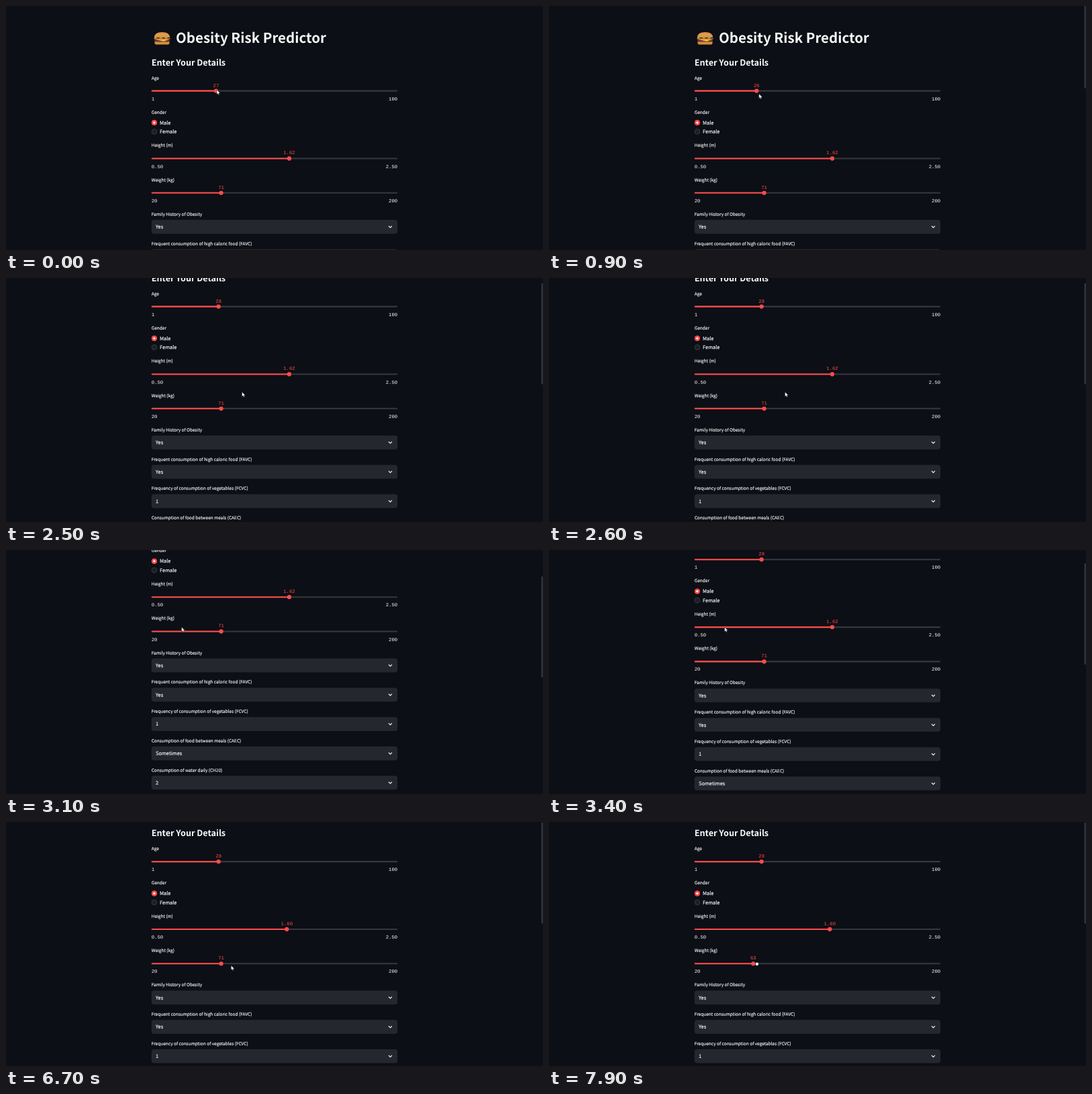
An HTML page that plays this animation: 800x364 px, repeating every 8 s.

```html
<!DOCTYPE html>
<html lang="en">
<head>
<meta charset="utf-8">
<title>Obesity Risk Predictor</title>
<style>
  html, body { margin: 0; width: 100%; height: 100%; overflow: hidden; background: #0c0f15; }
  svg { display: block; width: 800px; height: 364px; }
  text { fill: #fafafa; font-family: "Noto Sans CJK JP", "Noto Sans CJK SC", "Open Sans", sans-serif; text-rendering: geometricPrecision; }
  .title { font-size: 20.5px; font-weight: 700; }
  .heading { font-size: 12.65px; font-weight: 600; }
  .label, .option { stroke: #fafafa; stroke-width: .14px; }
  .label { font-size: 6.53px; }
  .option { font-size: 7.46px; }
  .num { font: 7.29px "Liberation Mono", monospace; }
  .value { fill: #ff4b4b; text-anchor: middle; }
  .end { text-anchor: end; }
</style>
</head>
<body>
<svg viewBox="0 0 800 364">
  <g id="page"></g>
  <rect id="bar" x="797.8" width="1.6" height="151" rx=".8" fill="#42454c"/>
  <g id="cursor" stroke="#14161c" stroke-width=".5" stroke-linejoin="round" fill="#fff">
    <path id="arrow" d="M0 0V6.8L1.6 5.4 2.7 7.7 3.9 7.1 2.9 5H5Z"/>
    <path id="hand" d="M-.8 .8Q0-.4 .8 .8V3.4L3.8 4.2Q4.8 4.6 4.4 6.4L3.6 9H-.4L-2.6 6Q-3 4.6-.8 5.6Z"/>
    <rect id="fist" width="4.4" height="4.6" rx="1.6"/>
  </g>
</svg>
<script>
const LEFT = 216.7, WIDTH = 366.5, RIGHT = LEFT + WIDTH;
const RED = '#ff4b4b', LOOP = 8000, MOVE = 400;
const $ = id => document.getElementById(id);
const set = (id, attrs) => { for (const k in attrs) $(id).setAttribute(k, attrs[k]); };

const text = (cls, x, y, s, id = '') => `<text class="${cls}" id="${id}" x="${x}" y="${y}">${s}</text>`;

// Keys are [arrival time, value, ...]; every move takes the last MOVE ms before its arrival.
const sliders = {
  age: { label: 'Age', min: 1, max: 100, digits: 0, y: 126.6, keys: [[0, 27], [900, 26], [2200, 28]] },
  height: { label: 'Height (m)', min: .5, max: 2.5, digits: 2, y: 227.5, keys: [[0, 1.62], [6000, 1.6]] },
  weight: { label: 'Weight (kg)', min: 20, max: 200, digits: 0, y: 278.8, keys: [[0, 71], [7800, 63]] }
};
const scrollKeys = [[0, 0], [2500, 84], [3100, 157.3], [3600, 67.5]];
const genderKeys = [[0, 'Male'], [4200, 'Female'], [4900, 'Male']];
const pointerKeys = [
  [0, 314, 125, 'arrow'], [900, 312.8, 131, 'arrow'], [2500, 351.5, 170, 'arrow'],
  [3100, 261.5, 115, 'arrow'], [4100, 243, 116, 'hand'], [4700, 242.8, 106, 'hand'],
  [5500, 421, 159, 'arrow'], [6700, 335.3, 214, 'arrow'], [7100, 324, 210, 'fist'], [7800, 307.7, 209.6, 'fist']];

const hold = (keys, t) => keys.filter(k => k[0] <= t).pop();
const ease = (keys, t, n = 1) => {
  const a = hold(keys, t), b = keys[keys.indexOf(a) + 1] || a;
  const p = Math.max(0, 1 - (b[0] - t) / MOVE);
  return a === b ? a[n] : a[n] + (b[n] - a[n]) * p * p * (3 - 2 * p);
};

const slider = ([id, s]) =>
  text('label', LEFT, s.y - 17.1, s.label) +
  `<rect x="${LEFT}" y="${s.y - 1.05}" width="${WIDTH}" height="2.1" rx="1" fill="#36383e"/>
   <rect id="${id}Fill" x="${LEFT}" y="${s.y - 1.05}" height="2.1" rx="1" fill="${RED}"/>
   <circle id="${id}Thumb" cy="${s.y}" r="3.15" fill="${RED}"/>` +
  text('num value', 0, s.y - 6.1, '', id + 'Value') +
  text('num', LEFT, s.y + 14.1, s.min.toFixed(s.digits)) +
  text('num end', RIGHT, s.y + 14.1, s.max.toFixed(s.digits));

const radio = (name, y) =>
  `<circle id="${name}" cx="220.9" cy="${y}" r="3.9" stroke-width=".6"/>
   <circle id="${name}Dot" cx="220.9" cy="${y}" r="1.6" fill="#fff"/>` +
  text('option', 229, y + 2.8, name);

const select = ([label, value], i) => {
  const y = 329.4 + i * 43.75;
  return text('label', LEFT, y - 16.5, label) +
    `<rect x="${LEFT}" y="${y - 10.3}" width="${WIDTH}" height="20.6" rx="4" fill="#25272f"/>
     <path d="M570 ${y - 1.2}l2.5 2.5 2.5-2.5" fill="none" stroke="#fafafa" stroke-width="1.2"/>` +
    text('option', 223, y + 2.8, value);
};

const burger = `
  <path d="M221 47Q221 39 232.5 39T244 47Z" fill="#dc9447"/>
  <path d="M225 43h15" stroke="#f8dfa8" stroke-width=".9" stroke-dasharray="1 2.5"/>
  <path d="M220.6 47.4q2-1.6 4 0t4 0 4 0 4 0 4 0 4 0v1.8h-24Z" fill="#7fb23f"/>
  <rect x="221.4" y="48.6" width="22.2" height="1.5" fill="#d9482f"/>
  <rect x="221" y="50" width="23" height="3.2" rx="1.4" fill="#67372a"/>
  <path d="M222 49.8h21l-8 3Z" fill="#f5c543"/>
  <path d="M221.4 53.2h22.2v1.6q0 2.8-3 2.8h-16.2q-3 0-3-2.8Z" fill="#d58c40"/>`;

$('page').innerHTML = burger +
  text('title', 253, 55, 'Obesity Risk Predictor') +
  text('heading', LEFT, 88.6, 'Enter Your Details') +
  text('label', LEFT, 160.7, 'Gender') + radio('Male', 174) + radio('Female', 187.4) +
  Object.entries(sliders).map(slider).join('') +
  [['Family History of Obesity', 'Yes'],
   ['Frequent consumption of high caloric food (FAVC)', 'Yes'],
   ['Frequency of consumption of vegetables (FCVC)', '1'],
   ['Consumption of food between meals (CAEC)', 'Sometimes'],
   ['Consumption of water daily (CH20)', '2']].map(select).join('');

function draw(now) {
  const t = Math.floor(now % LOOP / 100) * 100;
  const scroll = ease(scrollKeys, t);
  set('page', { transform: `translate(0 ${-scroll})` });
  set('bar', { y: -28 + scroll * .427, opacity: t < 500 ? 0 : 1 });

  for (const [id, s] of Object.entries(sliders)) {
    const label = ease(s.keys, t).toFixed(s.digits);
    const w = WIDTH * (label - s.min) / (s.max - s.min);
    set(id + 'Fill', { width: w });
    set(id + 'Thumb', { cx: LEFT + w });
    set(id + 'Value', { x: LEFT + w });
    $(id + 'Value').textContent = label;
  }

  const gender = hold(genderKeys, t)[1];
  for (const name of ['Male', 'Female']) {
    const on = name === gender;
    set(name, { fill: on ? RED : '#1c1f27', stroke: on ? RED : '#4a4d55' });
    set(name + 'Dot', { opacity: on ? 1 : 0 });
  }

  const shape = hold(pointerKeys, t)[3];
  for (const id of ['arrow', 'hand', 'fist']) set(id, { visibility: id === shape ? 'visible' : 'hidden' });
  set('cursor', { transform: `translate(${ease(pointerKeys, t)} ${ease(pointerKeys, t, 2)})` });
}

const start = performance.now();
(function frame() {
  draw(performance.now() - start);
  requestAnimationFrame(frame);
})();
</script>
</body>
</html>
```
